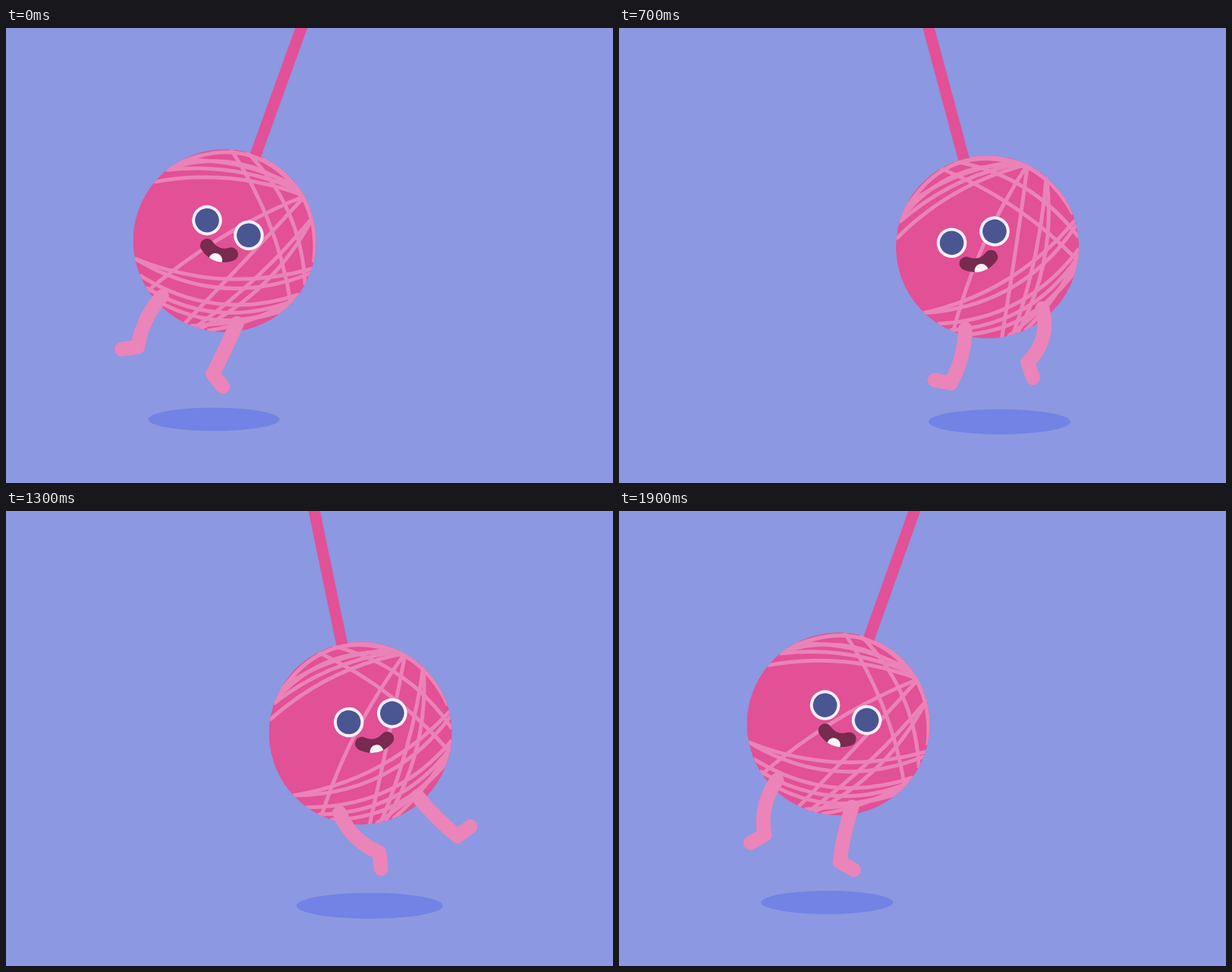
Write an HTML page that moves like this. It is 800 px wide and 600 px high and loops after 2 s.

```html
<!DOCTYPE html>
<html lang="en">
<head>
<meta charset="utf-8">
<title>Swinging yarn ball</title>
<style>
  html, body { margin: 0; width: 100%; height: 100%; overflow: hidden; background: #8c98e1; }
  svg { display: block; width: 100%; height: 100%; }
  .line { fill: none; stroke: #ea83b8; stroke-width: 5; }
  .leg { fill: none; stroke: #eb84b8; stroke-width: 18.8; stroke-linecap: round; stroke-linejoin: round; }
  .mouth { fill: none; stroke-width: 18; stroke-linecap: round; }
</style>
</head>
<body>
<svg viewBox="0 0 800 600">
  <defs>
    <clipPath id="disc"><circle r="120.5"/></clipPath>
    <path id="smile" class="mouth" d="M-18 31.3Q-1 43.6 16 31.3"/>
    <mask id="lips" maskUnits="userSpaceOnUse" x="-40" y="10" width="80" height="50">
      <use href="#smile" stroke="#fff"/>
    </mask>
    <g id="eye">
      <circle r="19.8" fill="#f7f0fa"/>
      <circle r="15.8" fill="#4a5692"/>
    </g>
  </defs>
  <rect width="800" height="600" fill="#8c98e1"/>
  <ellipse id="shadow" fill="#7283e5"/>
  <g id="swing">
    <path d="M0 -20V330" stroke="#e25096" stroke-width="15"/>
    <g transform="translate(0 330)">
      <circle r="120.5" fill="#e25096"/>
      <g id="yarn" clip-path="url(#disc)"></g>
      <g id="face">
        <g id="eyes">
          <use href="#eye" transform="translate(-29.2 0)"/>
          <use href="#eye" transform="translate(29.2 0)"/>
        </g>
        <path id="lids" d="M-46.8 0h35.2M11.6 0h35.2" stroke="#f7f0fa" stroke-width="4.4"/>
        <use href="#smile" stroke="#782a50"/>
        <circle cx="-1" cy="45.5" r="9" fill="#fbf5fb" mask="url(#lips)"/>
      </g>
    </g>
  </g>
  <path id="left" class="leg"/>
  <path id="right" class="leg"/>
</svg>
<script>
const LOOP = 2000, PIVOT = { x: 400, y: -30 }, LENGTH = 330, SWING = 19.87;
const BALL = 121, HIP_X = 52.6, HIP_Y = 97, LEG = 74, FOOT = 21.5;
const $ = id => document.getElementById(id);
const rad = deg => deg * Math.PI / 180;
const clamp = (v, a, b) => Math.min(b, Math.max(a, v));
const wrap = t => ((t % LOOP) + LOOP) % LOOP;
const wave = (t, peak) => Math.cos(2 * Math.PI * (t - peak) / LOOP);
const set = (id, attrs) => { for (const k in attrs) $(id).setAttribute(k, attrs[k]); };

// Quadratic curve whose middle stands off its chord by bow.
function bowed(a, b, bow) {
  const dx = b.x - a.x, dy = b.y - a.y, k = 2 * bow / Math.hypot(dx, dy);
  return `M${a.x} ${a.y}Q${(a.x + b.x) / 2 + k * dy} ${(a.y + b.y) / 2 - k * dx} ${b.x} ${b.y}`;
}

// A bundle fans out from its first strand to its last: rim angle, rim angle, bow.
const bundles = [
  { count: 3, first: [200, 311, 14], last: [221, 306, 12] },
  { count: 2, first: [212, 315, 28], last: [212, 320, 46] },
  { count: 3, first: [254, 24, 12], last: [274, -6, 25] },
  { count: 2, first: [311, 127, -10], last: [311, 96, 1] },
  { count: 2, first: [325, 89, 7], last: [325, 86, 17] },
  { count: 2, first: [149, -2, -20], last: [149, 1, -29] },
  { count: 3, first: [138, 16, -25], last: [121, 25, -24] },
  { count: 2, first: [81, 19, -6], last: [92, 30, -4] }
];
const rim = deg => ({ x: BALL * Math.cos(rad(deg)), y: BALL * Math.sin(rad(deg)) });

function wind({ count, first, last }) {
  let out = '';
  for (let i = 0; i < count; i++) {
    const [from, to, bow] = first.map((v, k) => v + (last[k] - v) * i / (count - 1));
    out += `<path class="line" d="${bowed(rim(from), rim(to), bow)}"/>`;
  }
  return out;
}
$('yarn').innerHTML = bundles.map(wind).join('');

const smooth = s => s * s * (3 - 2 * s);

// Same as cubic-bezier(.5, 0, .5, 1).
function strongEase(x) {
  let s = x;
  for (let i = 0; i < 8; i++)
    s -= (1.5 * s - 1.5 * s * s + s * s * s - x) / (1.5 - 3 * s + 3 * s * s);
  return smooth(s);
}

// Goes from -1 to 1 in half a loop and back again.
function sway(t, ease) {
  const u = wrap(t) / (LOOP / 2);
  return u < 1 ? 2 * ease(u) - 1 : 1 - 2 * ease(u - 1);
}

// Both legs make the same stride, mirrored and half a loop apart.
function legPath(t, hip, side) {
  const lean = rad(-45 * wave(t, 310)), foot = rad(150 + 70 * wave(t, 400));
  const ankle = { x: hip.x + side * LEG * Math.sin(lean), y: hip.y + LEG * Math.cos(lean) };
  const bend = 3 + 8 * wave(t, 1600);
  const toe = [side * FOOT * Math.cos(foot), FOOT * Math.sin(foot)];
  return `${bowed(hip, ankle, -side * bend)}l${toe}`;
}

function draw(t) {
  const pull = sway(t + 33, strongEase), angle = SWING * pull;
  const look = 20.2 * sway(t - 472, smooth);
  const sin = Math.sin(rad(angle)), cos = Math.cos(rad(angle));
  const toStage = (x, y) => ({ x: PIVOT.x + x * cos + y * sin, y: PIVOT.y - x * sin + y * cos });

  set('swing', { transform: `translate(${PIVOT.x} ${PIVOT.y}) rotate(${-angle})` });
  set('face', { transform: `translate(${look} -17.4)` });

  const open = clamp((Math.abs(t - 500) - 35) / 50, 0, 1), shut = open < .12;
  set('eyes', { transform: `scale(1 ${Math.max(open, .01)})`, visibility: shut ? 'hidden' : 'visible' });
  set('lids', { visibility: shut ? 'visible' : 'hidden' });

  const hip = side => toStage(side * HIP_X + look * .25, LENGTH + HIP_Y);
  set('left', { d: legPath(t, hip(-1), 1) });
  set('right', { d: legPath(t + LOOP / 2, hip(1), -1) });

  const shrink = 13.1 * Math.pow(Math.abs(pull), 2.75), rx = 99.6 - shrink;
  set('shadow', {
    cx: 397 + 10 * wave(t, 0) ** 2 + 133.5 * pull,
    cy: 522 - shrink * .46, rx, ry: rx * .177
  });
}

const start = performance.now();
function tick() {
  draw(wrap(performance.now() - start));
  requestAnimationFrame(tick);
}
tick();
</script>
</body>
</html>
```
